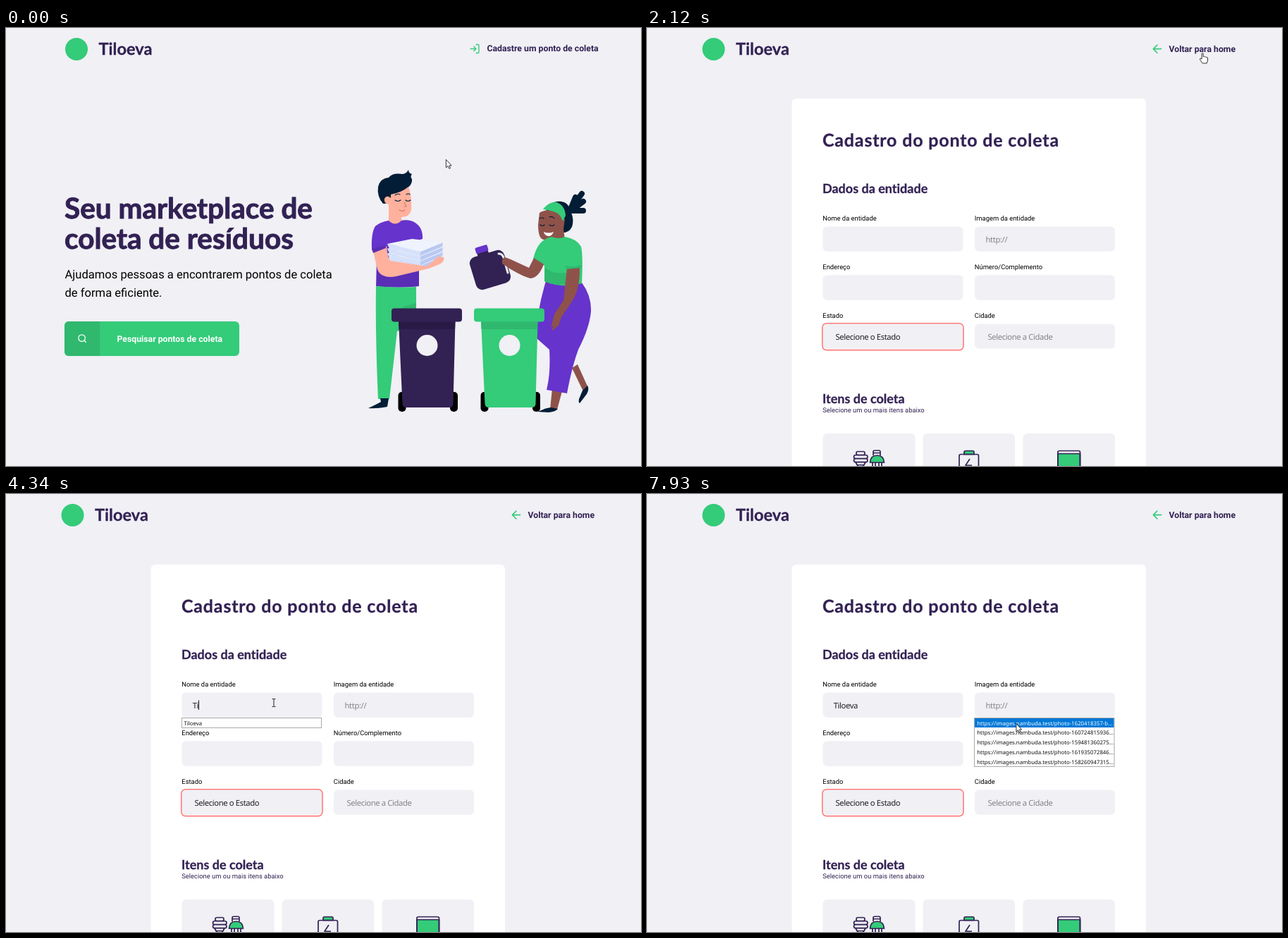
Recreate the animation shown at these times as an HTML page. Size 901 by 621 pixels, loop 8 s.

```html
<!DOCTYPE html>
<html lang="pt-BR">
<head>
<meta charset="utf-8">
<title>Cadastro</title>
<style>
html, body { margin: 0; width: 100%; height: 100%; overflow: hidden; background: #f0f0f5 }
svg { display: block; width: 901px; height: 621px; text-rendering: geometricPrecision }
.ttl { font-family: Lato, sans-serif; font-weight: 700; font-variant-ligatures: none; fill: #322153; stroke: #322153; stroke-width: .3 }
.logo { font-size: 23.6px }
.h1 { font-size: 40.5px; stroke-width: .9 }
.h2 { font-size: 25px; letter-spacing: .82px }
.h3 { font-size: 18px }
.nav { font: 700 12.25px Roboto, sans-serif; fill: #322153 }
.lead { font: 16.58px Roboto, sans-serif }
.lab { font: 9.4px Roboto, sans-serif }
.inp { font: 11.3px "Noto Sans", sans-serif; letter-spacing: -.4px; fill: #222 }
.hint { fill: #85858a }
.opt { font: 7.8px "Noto Sans", sans-serif; fill: #111 }
.box { fill: #f0f0f5 }
.list { fill: #fff; stroke: #a9a9a9 }
.ico { fill: none; stroke: #34cb79; stroke-width: 2; stroke-linecap: round; stroke-linejoin: round }
.green { fill: #34cb79 } .shade { fill: #2fb86e }
.indigo { fill: #322153 } .purple { fill: #6633cc } .deep { fill: #5a2db5 }
.navy { fill: #031d36 } .skin { fill: #ffb19d } .brown { fill: #8f524a }
.line { fill: none; stroke: #031d36; stroke-width: 1.1; stroke-linecap: round }
.faint { stroke: #d9776a }
.item { stroke: #322153; stroke-width: 1.7; stroke-linejoin: round }
</style>
</head>
<body>
<svg viewBox="0 0 901 621">
<defs>
  <g id="sheet">
    <path fill="#b9c9f1" d="M541 306 588 317 620 304 619 310 588 323 544 312Z"/>
    <path fill="#d6e1fa" d="M541 306 588 317V323L544 312Z"/>
    <path fill="#eef3fd" d="M541 306 576 299 620 304 588 317Z"/>
  </g>
</defs>

<g id="home">
  <circle class="green" cx="100" cy="30" r="16"/>
  <text class="ttl logo" x="131.5" y="38">Tiloeva</text>
  <path class="ico" transform="translate(657 21.5) scale(.667)" d="M15 3h4a2 2 0 0 1 2 2v14a2 2 0 0 1-2 2h-4M10 17l5-5-5-5M15 12H3"/>
  <text class="nav" x="682.5" y="33.3">Cadastre um ponto de coleta</text>
  <text class="ttl h1" x="83" y="270">Seu marketplace de</text>
  <text class="ttl h1" x="83" y="312.5">coleta de resíduos</text>
  <text class="lead" x="83.5" y="355.3">Ajudamos pessoas a encontrarem pontos de coleta</text>
  <text class="lead" x="83.5" y="381.3">de forma eficiente.</text>
  <rect class="green" x="83" y="416" width="248" height="49" rx="6"/>
  <path class="shade" d="M133 416H89a6 6 0 0 0-6 6v37a6 6 0 0 0 6 6H133Z"/>
  <path class="ico" style="stroke:#fff" transform="translate(101 433) scale(.6)" d="M3 11a8 8 0 1 0 16 0a8 8 0 1 0-16 0M21 21l-4.3-4.3"/>
  <text class="nav" style="fill:#fff" x="157.5" y="445">Pesquisar pontos de coleta</text>

  <!-- man -->
  <path class="navy" d="M535 249Q526 239 528 225 531 213 543 212 549 205 562 207 568 207 571 201 571 206 576 207 573 211 576 214 577 222 568 228L546 240V249Z"/>
  <path class="skin" d="M546 236Q562 233 571 225 576 238 575 258 573 268 561 268L562 277Q551 284 543 277V250Q536 249 537 242 540 236 546 241Z"/>
  <path class="line" d="M552 244q4 3 8 0M567 244q3 3 7 0M552 237q4-3 7-1M568 236q3-2 5 0"/>
  <path class="line faint" d="M558 258q4 3 8 0M565 247l3 6h-3"/>
  <path class="purple" d="M543 273Q531 275 524 281 518 290 519 314L526 325 525 366Q555 369 586 366L585 301 591 299Q592 281 577 274 569 271 561 273 552 282 543 273Z"/>
  <path class="deep" d="M540 305 586 318V366Q555 369 526 366V340L545 352 586 343Z"/>
  <path class="green" d="M525 366Q555 369 582 367V420L555 430 544 526H528Q524 440 525 366Z"/>
  <path class="shade" d="M582 390Q562 395 555 400H582Z"/>
  <path class="navy" d="M531 525H543L541 537Q525 540 514 539 525 534 532 530Z"/>
  <use href="#sheet" y="20"/><use href="#sheet" y="13.4"/><use href="#sheet" y="6.7"/><use href="#sheet"/>
  <path class="skin" d="M521 317 540 309Q541 324 545 330L597 338 613 324 621 325Q623 331 615 335L600 341 554 352Q532 356 527 342Z"/>
  <path class="deep" d="M519 313 539 308V312L521 319Z"/>

  <!-- woman -->
  <path d="M801 257 808 240M801 257 817 235M803 258 819 246M803 259 819 259" fill="none" stroke="#031d36" stroke-width="8" stroke-linecap="round"/>
  <path class="navy" d="M766 257Q774 244 788 246 799 248 800 258 807 270 803 282 798 292 786 290Z"/>
  <path class="brown" d="M757 262Q766 256 780 260L793 271 791 285 793 300Q782 307 773 301 764 302 759 298 755 293 755 279Z"/>
  <path class="green" d="M762 257Q770 246 781 247 793 251 794 266L790 274Q786 262 776 260 768 258 762 257Z"/>
  <path class="line" d="M758 279q3 3 6 0M771 279q4 3 7 0M757 270q4-2 6 0M771 268q4-2 7 2"/>
  <path fill="#fff" d="M763 289Q770 292 777 289 774 296 769 295 764 294 763 289Z"/>
  <path class="brown" d="M803 482 811 477 826 510 819 515ZM775 511 789 515 782 541H772Z"/>
  <path class="navy" d="M825 507Q828 512 824 519L814 532Q812 531 813 526L818 514ZM754 544Q768 538 774 538L783 540Q780 544 770 545Z"/>
  <path class="purple" d="M766 359Q790 368 817 361 831 380 830 402 828 425 812 456 803 480 796 518L767 513Q773 490 771 456L753 440Q752 405 766 359Z"/>
  <path class="green" d="M774 296Q784 300 793 296 810 299 816 310 819 322 817 362 790 370 764 359V337L748 328Q754 300 774 296Z"/>
  <path class="shade" d="M765 340Q778 350 795 347V363Q778 366 764 359Z"/>
  <g transform="rotate(-17 687 343)">
    <rect class="indigo" x="661.5" y="319" width="51" height="48" rx="9"/>
    <path class="indigo" d="M676 313h16v8h-16Z"/>
    <rect class="purple" x="675" y="307" width="18" height="9" rx="2"/>
  </g>
  <path d="M699 320Q705 319 707 329L712 347" fill="none" stroke="#f0f0f5" stroke-width="3" stroke-linecap="round"/>
  <path class="brown" d="M749 326 763 335Q756 354 744 355 735 353 716 342L704 334Q703 326 708 325L716 328 742 340Z"/>
  <path class="brown" d="M796 340 814 338Q815 374 800 392L788 410 784 422 774 430 777 421 773 425 778 406 791 386Z"/>
  <path class="shade" d="M794 337Q806 340 816 336V340L795 342Z"/>

  <!-- bins -->
  <g id="bin">
    <rect x="556.5" y="516" width="11" height="28" rx="5"/><rect x="630" y="516" width="11" height="28" rx="5"/>
    <path class="body" d="M557 415H637.5L634.5 533Q634 538 629 538H568Q563 538 562.5 533Z"/>
    <path class="band" d="M557 415H637.5L637 427H557.5Z"/>
    <rect class="body" x="547" y="397.5" width="100" height="19" rx="4"/>
    <circle cx="597.5" cy="450" r="15" fill="#f0f0f5"/>
  </g>
</g>

<g id="form">
  <circle class="green" cx="94.5" cy="30" r="16"/>
  <text class="ttl logo" x="126" y="38">Tiloeva</text>
  <path class="ico" transform="translate(714.4 20) scale(.8)" d="M19 12H5M12 19l-7-7 7-7"/>
  <text class="nav" x="740.5" y="34">Voltar para home</text>
  <path fill="#fff" d="M205.5 621V106a6 6 0 0 1 6-6H702a6 6 0 0 1 6 6V621Z"/>
  <text class="ttl h2" x="249" y="168">Cadastro do ponto de coleta</text>
  <text class="ttl h3" x="249" y="233.5">Dados da entidade</text>
  <g id="fields"></g>
  <rect x="248.8" y="418.8" width="200.2" height="37.8" rx="6" fill="none" stroke="#ff7a7a" stroke-width="1.6"/>
  <text class="inp" x="267.5" y="442">Selecione o Estado</text>
  <text class="inp hint" x="483.5" y="442">Selecione a Cidade</text>
  <text class="inp hint" x="480.5" y="303.5">http://</text>
  <text class="inp" id="typed" x="264.7" y="303.5"></text>
  <text class="ttl h3" x="249" y="532.3">Itens de coleta</text>
  <text class="lab" style="fill:#322153" x="249.3" y="544.5">Selecione um ou mais itens abaixo</text>
  <g class="box">
    <rect x="249.5" y="575" width="131" height="60" rx="6"/><rect x="391.5" y="575" width="130.5" height="60" rx="6"/><rect x="533.5" y="575" width="130.5" height="60" rx="6"/>
  </g>
  <g class="item" fill="none">
    <rect x="297" y="600.5" width="12" height="5" rx="2"/><rect x="293.5" y="605.5" width="19.5" height="5" rx="2.5"/><rect x="293.5" y="610.5" width="19.5" height="5" rx="2.5"/><path d="M296 615.5h14l-2 4h-10ZM299 620v4h8v-4"/>
    <path d="M321 606v-5q0-2 2-2h6q2 0 2 2v5M321 602.5h10"/><path class="green" d="M316.5 616Q317 606 326.5 606T336.5 616Z"/><path d="M320 616v8M324 616v8M329 616v8M333 616v8"/>
    <path class="green" d="M450 604.5v-3q0-2 2-2h10q2 0 2 2v3Z"/><rect x="443" y="604.5" width="27.5" height="30" rx="2"/><path d="M458 611l-6 9h9"/>
    <path class="green" d="M583 603.5H614.5V630H583Z"/><rect x="583" y="599.5" width="31.5" height="40" rx="2"/>
  </g>
  <g id="nameList">
    <rect class="list" x="249.5" y="317.5" width="198" height="14"/>
    <text class="opt" x="252.5" y="327.6">Tiloeva</text>
  </g>
  <g id="linkList">
    <rect class="list" x="464.5" y="317.5" width="198.5" height="69"/>
    <rect id="hover" x="465" y="318" width="197.5" height="13" fill="#0078d7"/>
  </g>
  <path id="caret" d="M0 292.5v13.5" stroke="#111"/>
</g>

<path id="arrow" fill="#fff" stroke="#222" stroke-width=".9" d="M.4.5V12L3 9.6 4.8 13.4 6.6 12.6 4.9 9H8.2Z"/>
<path id="hand" fill="#fff" stroke="#222" stroke-width=".9" stroke-linejoin="round" d="M-.8 9V1.2Q0 0 1.2 1V5.8Q2.5 4.8 3.5 6 4.8 5.2 5.7 6.6 7.5 6 7.6 8V11L6.3 15H.2L-3.3 10Q-3.8 7.8-2.2 8Z"/>
<path id="beam" fill="none" stroke="#222" d="M-2.5-5.5H-.6L0-5 .6-5.5H2.5M-2.5 5.5H-.6L0 5 .6 5.5H2.5M0-5V5"/>
</svg>

<script>
const $ = id => document.getElementById(id);
const show = (id, on) => $(id).style.display = on ? '' : 'none';
const make = (parent, tag, attrs, text = '') => {
  const el = document.createElementNS('http://www.w3.org/2000/svg', tag);
  for (const k in attrs) el.setAttribute(k, attrs[k]);
  el.textContent = text;
  return $(parent).appendChild(el);
};

['Nome da entidade', 'Imagem da entidade', 'Endereço', 'Número/Complemento', 'Estado', 'Cidade'].forEach((name, i) => {
  const x = i % 2 ? 465 : 249.5, y = 281.5 + 69 * (i >> 1);
  make('fields', 'rect', { class: 'box', x, y, width: 199, height: 35.3, rx: 6 });
  make('fields', 'text', { class: 'lab', x: x - .2, y: y - 8.3 }, name);
});

const links = ['1620418357-b', '160724815936', '159481360275', '161935072846', '158260947315'].map((id, i) =>
  make('linkList', 'text', { class: 'opt', x: 468.3, y: 327.6 + 13.8 * i }, `https://images.nambuda.test/photo-${id}...`));

const bin = $('bin').cloneNode(true);
bin.removeAttribute('id');
bin.setAttribute('transform', 'translate(117 0)');
$('home').append(bin);
const paint = (g, body, band) => {
  g.querySelectorAll('.body').forEach(el => el.style.fill = body);
  g.querySelector('.band').style.fill = band;
};
paint($('bin'), '#322153', '#281a45');
paint(bin, '#34cb79', '#2fb86e');

const keys = [3980, 4280, 4460, 4580, 4770, 5010, 5100];

// Each move: start, end, then the points of a quadratic path
const moves = [
  [550, 1340, [624, 186], [775, 187], [788, 35]],
  [2330, 3120, [788, 34], [498, 270], [380, 296]],
  [5760, 6080, [380, 296], [453, 300], [526.5, 309]],
  [7140, 7460, [526.5, 309], [526, 317], [523.5, 325]]
];

function pointer(t) {
  const [from, to, a, b, c] = moves.filter((m, i) => !i || t >= m[0]).pop();
  const p = Math.min(1, Math.max(0, (t - from) / (to - from)));
  const u = p * p * (3 - 2 * p), v = 1 - u;
  return [0, 1].map(i => v * v * a[i] + 2 * u * v * b[i] + u * u * c[i]);
}

function draw(t) {
  show('home', t < 2120);
  show('form', t >= 2120);

  $('typed').textContent = 'Tiloeva'.slice(0, keys.filter(k => t >= k).length);
  show('nameList', t >= 3980 && t < 5760);
  show('linkList', t >= 6580);

  const [x, y] = pointer(t);
  const hover = t > 7140 && y > 317;
  show('hover', hover);
  links[0].style.fill = hover ? '#fff' : '';

  const first = t >= 3170 && t < 3700 || t >= 3980 && t < 5260;
  show('caret', first || t >= 6580 && t < 7670);
  const caretX = first ? Math.round(265 + $('typed').getComputedTextLength()) + .5 : 481.5;
  $('caret').setAttribute('transform', `translate(${caretX} 0)`);

  const inField = t > 2120 && y > 281.5 && y < 317 && (x < 448.5 || x > 465 && x < 664);
  const kind = t >= 1360 && t < 2380 ? 'hand' : inField ? 'beam' : 'arrow';
  for (const id of ['arrow', 'hand', 'beam']) show(id, id === kind);
  $(kind).setAttribute('transform', `translate(${x} ${y})`);
}

function tick() {
  draw(performance.now() % 8000);
  requestAnimationFrame(tick);
}
tick();
</script>
</body>
</html>
```
